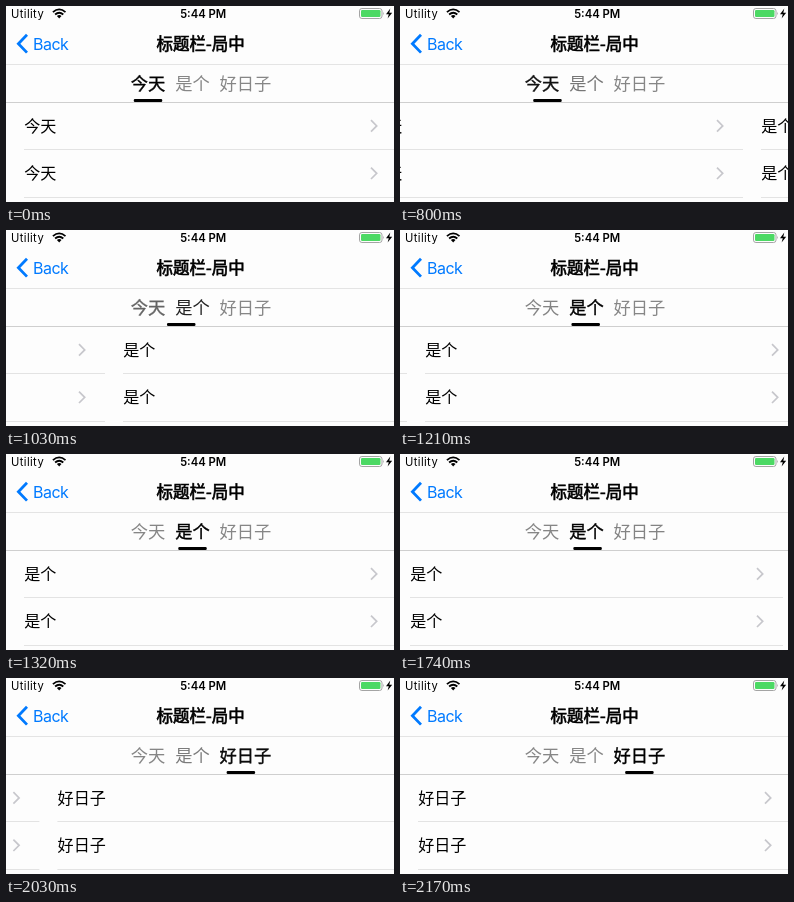
An HTML page that plays this animation: 388 px wide and 196 px high, repeating every 2980 ms.

```html
<!DOCTYPE html>
<html lang="zh-CN">
<head>
<meta charset="utf-8">
<style>
html, body { margin: 0; width: 100%; height: 100%; overflow: hidden; background: #fdfdfd; }
svg { display: block; width: 388px; height: 196px; }
text { font-family: "Noto Sans CJK SC", "Noto Sans CJK", sans-serif; white-space: pre; }
.ui { font-family: Inter, "Liberation Sans", sans-serif; }
.tab { font-size: 17.3px; text-anchor: middle; }
.row { font-size: 16.1px; }
.arrow { fill: none; stroke: #c7c7cc; stroke-width: 1.7; }
</style>
</head>
<body>
<svg viewBox="0 0 388 196">
  <rect width="388" height="196" fill="#fdfdfd"/>
  <text class="ui" x="5" y="12" font-size="11.2" letter-spacing=".4">Utility</text>
  <g fill="none" stroke="#000" stroke-width="1.8">
    <path d="M46.9 6.1Q53.2 .7 59.5 6.1"/>
    <path d="M49.1 8.5Q53.2 4.9 57.3 8.5"/>
  </g>
  <path d="M50.9 10Q53.2 8.2 55.5 10L53.2 12.4Z"/>
  <text class="ui" x="197.2" y="12" font-size="11.3" font-weight="600" text-anchor="middle">5:44 PM</text>
  <rect x="353.5" y="2.5" width="22.5" height="10" rx="2.4" fill="#fdfdfd" stroke="#a4a4a4"/>
  <rect x="355" y="4" width="19.5" height="7" rx="1.2" fill="#4cd964"/>
  <path d="M377 5.8q1.6 1.7 0 3.4z" fill="#a4a4a4"/>
  <path d="M384.3 2.5L380 8.2H382.8L381.6 12.5L386.2 6.7H383.3Z"/>
  <path d="M21 28.8L12.4 37.7L21 46.6" fill="none" stroke="#007aff" stroke-width="2.8"/>
  <text class="ui" x="27" y="43.5" font-size="16" letter-spacing="-.5" fill="#007aff">Back</text>
  <text x="194.6" y="43.5" font-size="16.5" text-anchor="middle" stroke="#000" stroke-width=".65">标题栏-局中</text>
  <rect y="58" width="388" height="1" fill="#e4e4e4"/>
  <g id="tabs"></g>
  <rect y="96" width="388" height="1" fill="#cfcfcf"/>
  <rect id="bar" y="93" width="28.5" height="3" rx="1.2"/>
  <g id="pages"></g>
</svg>
<script>
const LOOP = 2980, PAGE = 391, TAU = 68;
const names = ["今天", "是个", "好日子"];
const centers = [142, 186.5, 239.4];
// Moments at which the screen refreshes during the two swipes.
const ticks = [0, 800, 860, 920, 970, 1030, 1060, 1100, 1140, 1170, 1210, 1270, 1320,
  1740, 1800, 1860, 1920, 1980, 2040, 2100, 2170];
const swipes = [
  { start: 800, release: 1030, end: 1320, from: 48, to: 292, rest: PAGE, power: 1.3 },
  { start: 1740, release: 1860, end: 2170, from: 399, to: 587, rest: 2 * PAGE, power: 1.4 }
];
const $ = id => document.getElementById(id);

function add(parent, tag, attrs, label) {
  const el = document.createElementNS("http://www.w3.org/2000/svg", tag);
  for (const key in attrs) el.setAttribute(key, attrs[key]);
  if (label) el.textContent = label;
  return parent.appendChild(el);
}

const tabs = names.map((name, i) =>
  add($("tabs"), "text", { class: "tab", x: centers[i], y: 83.8 }, name));

names.forEach((name, i) => {
  const page = add($("pages"), "g", { transform: `translate(${i * PAGE} 0)` });
  [119.8, 167.2].forEach(y => {
    add(page, "text", { class: "row", x: 18.2, y: y + 6 }, name);
    add(page, "path", { class: "arrow", d: `M365 ${y - 5.6}l5.7 5.7l-5.7 5.7` });
  });
  [143, 191].forEach(y =>
    add(page, "rect", { x: 18, y, width: PAGE - 18, height: 1, fill: "#e3e3e3" }));
});

function scrollAt(t) {
  let x = 0;
  for (const s of swipes) {
    if (t < s.start) break;
    if (t >= s.end) x = s.rest;
    else if (t < s.release) {
      const u = (t - s.start) / (s.release - s.start);
      x = s.from + (s.to - s.from) * u ** s.power;
    } else x = s.rest - (s.rest - s.to) * Math.exp((s.release - t) / TAU);
  }
  return x;
}

function render(time) {
  const t = time % LOOP;
  const x = scrollAt(ticks.filter(v => v <= t).pop());
  const p = x / PAGE;
  const i = Math.min(1, Math.floor(p));
  const center = centers[i] + (centers[i + 1] - centers[i]) * (p - i);
  const selected = Math.floor(p + 0.1);
  $("pages").setAttribute("transform", `translate(${-x} 0)`);
  $("bar").setAttribute("x", center - 14.25);
  tabs.forEach((tab, k) => {
    const v = Math.round(134 * Math.min(1, Math.abs(p - k)));
    const color = `rgb(${v},${v},${v})`;
    tab.setAttribute("fill", color);
    tab.setAttribute("stroke", color);
    tab.setAttribute("stroke-width", k === selected ? 0.35 : 0);
  });
}

const began = performance.now();
function loop() {
  render(performance.now() - began);
  requestAnimationFrame(loop);
}
loop();
</script>
</body>
</html>
```
